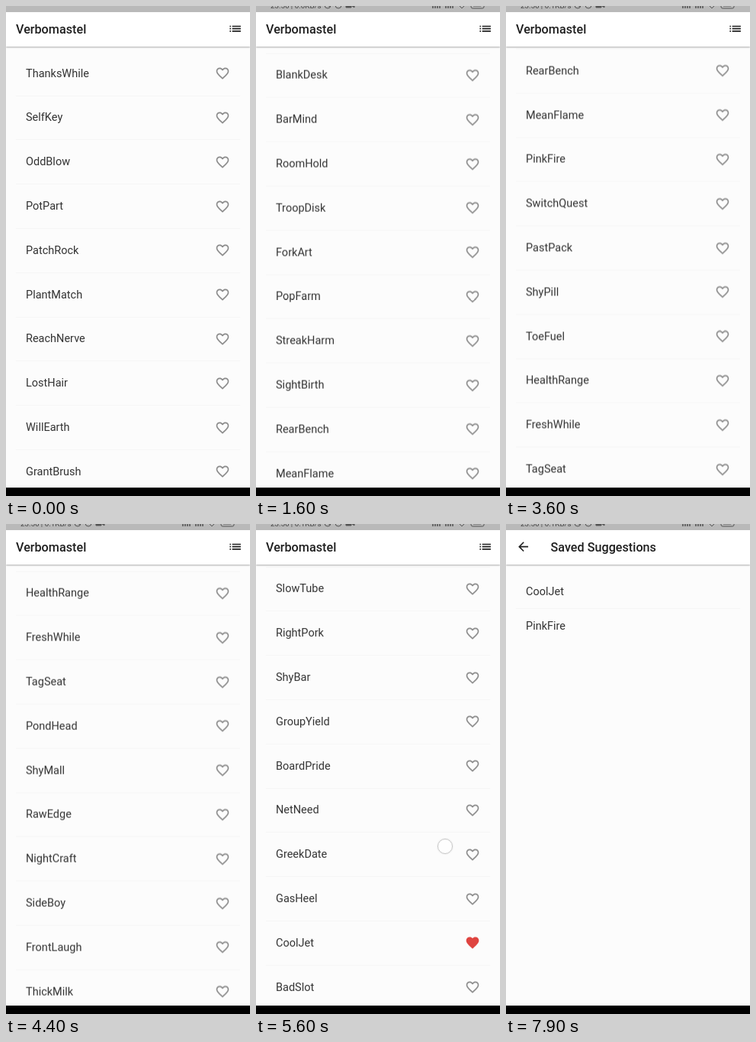
An HTML page that plays this animation: 320x640 px, repeating every 8000 ms.

```html
<!DOCTYPE html>
<html lang="en">
<head>
<meta charset="utf-8">
<title>Name list</title>
<style>
html, body { margin: 0; width: 100%; height: 100%; overflow: hidden; }
body { position: relative; background: #fcfcfc; color: #333; font: 14.5px Roboto, sans-serif; }
.page, .list { position: absolute; inset: 0; }
.page { background: #fcfcfc; overflow: hidden; }
.list { will-change: transform; }
.row { position: absolute; left: 26px; width: 268px; height: 45px; line-height: 45px; white-space: nowrap; }
.line { position: absolute; left: 13px; width: 294px; height: 1px; background: #f6f6f6; }
.row svg { position: absolute; left: 248px; top: 12.7px; width: 20px; height: 20px; }
svg { width: 19.3px; height: 19.3px; fill: #8c8c8c; overflow: visible; }
.liked svg { fill: #df4440; }
header { position: absolute; left: 0; top: 0; width: 100%; height: 52.5px; background: #fff;
  box-shadow: 0 1px 2px rgba(0,0,0,.32); color: #1f1f1f; font-size: 16.2px; font-weight: 500; }
header span { position: absolute; left: 13px; top: 20px; line-height: 21px; }
header svg { position: absolute; top: 20.4px; left: 290.8px; fill: #1f1f1f; }
#saved header span { left: 58.5px; }
#saved header svg { left: 13.3px; }
#ripple { position: absolute; left: 288px; top: 18px; width: 24px; height: 24px; border-radius: 50%; background: #000; opacity: 0; }
#touch { position: absolute; left: 238px; width: 18px; height: 18px; border: 1px solid #c6c6c6; border-radius: 50%;
  background: rgba(255,255,255,.75); box-shadow: 0 0 2px rgba(0,0,0,.15); }
#status { position: absolute; left: 0; top: 0; width: 100%; height: 8px; background: #b9b9b9; overflow: hidden; }
#status span { position: absolute; left: 19px; top: -6px; font-size: 9.8px; line-height: 11px; color: #444; white-space: nowrap; }
#status svg { position: absolute; left: 0; top: 0; width: 320px; height: 8px; fill: none; stroke: #555; }
#foot { position: absolute; left: 0; top: 629px; width: 100%; height: 11px; background: #000; }
</style>
</head>
<body>
<div class="page">
  <div class="list" id="list"></div>
  <div id="touch"></div>
  <header><span>Verbomastel</span>
    <svg viewBox="0 0 24 24"><path d="M3 13h2v-2H3zm0 4h2v-2H3zm0-8h2V7H3zm4 4h14v-2H7zm0 4h14v-2H7zM7 7v2h14V7z"/></svg>
    <div id="ripple"></div>
  </header>
</div>
<div class="page" id="saved">
  <div class="list" id="picks"></div>
  <header><span>Saved Suggestions</span>
    <svg viewBox="0 0 24 24"><path d="M20 11H7.83l5.59-5.59L12 4l-8 8 8 8 1.41-1.41L7.83 13H20z"/></svg>
  </header>
</div>
<div id="status">
  <div id="info"><span id="clock"></span>
    <svg viewBox="0 0 320 8">
      <circle cx="94" cy="-1" r="4"/><path d="M92-2l5 3"/><circle cx="108" cy="-1" r="4"/>
      <path d="M118-3v5h7v-5M126 0l3 2v-5" fill="#555"/>
      <path d="M232 3v-3M235 3v-4M238 3v-5M241 3v-6M249 3v-3M252 3v-4M255 3v-5M258 3v-6" stroke-width="1.6"/>
      <path d="M266-1l4 4 4-4"/><rect x="282" y="-5" width="17" height="8" rx="2"/><path d="M285 0h10"/>
    </svg>
  </div>
</div>
<div id="foot"></div>
<script>
const $ = id => document.getElementById(id);
const LOOP = 8000, STEP = 57.8, FIRST = 65.5;
const words = `ThanksWhile SelfKey OddBlow PotPart PatchRock PlantMatch ReachNerve LostHair WillEarth
GrantBrush DeadCause BlankDesk BarMind RoomHold TroopDisk ForkArt PopFarm StreakHarm SightBirth RearBench
MeanFlame PinkFire SwitchQuest PastPack ShyPill ToeFuel HealthRange FreshWhile TagSeat PondHead ShyMall
RawEdge NightCraft SideBoy FrontLaugh ThickMilk SlowTube RightPork ShyBar GroupYield BoardPride NetNeed
GreekDate GasHeel CoolJet BadSlot FatBone WetBite GreekJoy FrontPain BlindEarth PairSuite BrownFund
MarshTone`.split(/\s+/);

const solid = 'M12 21.35l-1.45-1.32C5.4 15.36 2 12.28 2 8.5 2 5.42 4.42 3 7.5 3c1.74 0 3.41.81 4.5 2.09C13.09 3.81 14.76 3 16.5 3 19.58 3 22 5.42 22 8.5c0 3.78-3.4 6.86-8.55 11.54z';
const hollow = 'M16.5 3c-1.74 0-3.41.81-4.5 2.09C10.91 3.81 9.24 3 7.5 3 4.42 3 2 5.42 2 8.5c0 3.78 3.4 6.86 8.55 11.54L12 21.35l1.45-1.32C18.6 15.36 22 12.28 22 8.5 22 5.42 19.58 3 16.5 3zm-4.4 15.55l-.1.1-.1-.1C7.14 14.24 4 11.39 4 8.5 4 6.5 5.5 5 7.5 5c1.54 0 3.04.99 3.57 2.36h1.87C13.46 5.99 14.96 5 16.5 5c2 0 3.5 1.5 3.5 3.5 0 2.89-3.14 5.74-7.9 10.05z';

const row = (word, top, extra = '') => `<div class="row" style="top:${top}px">${word}${extra}</div>`;
const line = top => `<div class="line" style="top:${top}px"></div>`;
const heart = `<svg viewBox="0 0 24 24"><path d="${hollow}"/></svg>`;

$('list').innerHTML = words.map((w, i) =>
  row(w, FIRST + i * STEP, heart) + line(FIRST + 51 + i * STEP)).join('');
$('picks').innerHTML = row('CoolJet', FIRST) + line(110) + row('PinkFire', FIRST + 45);

const easeOut = p => 1 - (1 - p) ** 2;
const smooth = p => p * p * (3 - 2 * p);
const part = (t, a, b) => Math.min(1, Math.max(0, (t - a) / (b - a)));

// Flings: start, end, target offset, easing
const flings = [
  [50, 1650, 634, easeOut],
  [1953, 3000, 1052, easeOut],
  [3550, 4450, 1501.7, easeOut],
  [4450, 5300, 2078, easeOut],
  [5545, 6350, 2518.7, smooth],
  [6350, 7000, 1050, easeOut]
];
const scrollAt = t => flings.reduce((y, [a, b, to, ease]) => y + (to - y) * ease(part(t, a, b)), 0);

const likes = [['CoolJet', 5350], ['PinkFire', 7060]].map(([word, at]) =>
  ({ el: $('list').querySelectorAll('.row')[words.indexOf(word)], at }));

function draw(t) {
  const y = scrollAt(t);
  $('list').style.transform = `translateY(${-y}px)`;
  for (const { el, at } of likes) {
    el.classList.toggle('liked', t >= at);
    el.querySelector('path').setAttribute('d', t >= at ? solid : hollow);
  }
  $('touch').style.display = t >= 5540 && t < 5700 ? 'block' : 'none';
  $('touch').style.top = 411 - (y - 2083.8) + 'px';
  $('ripple').style.opacity = t >= 7150 && t < 7600 ? .1 * part(t, 7150, 7250) : 0;
  $('saved').style.opacity = smooth(part(t, 7350, 7620));
  $('info').style.display = t < 100 ? 'none' : 'block';
  $('clock').textContent = `23:56 | 0.${t < 3600 ? 0 : 1}KB/s`;
}

const start = performance.now();
function tick() {
  draw((performance.now() - start) % LOOP);
  requestAnimationFrame(tick);
}
tick();
</script>
</body>
</html>
```
